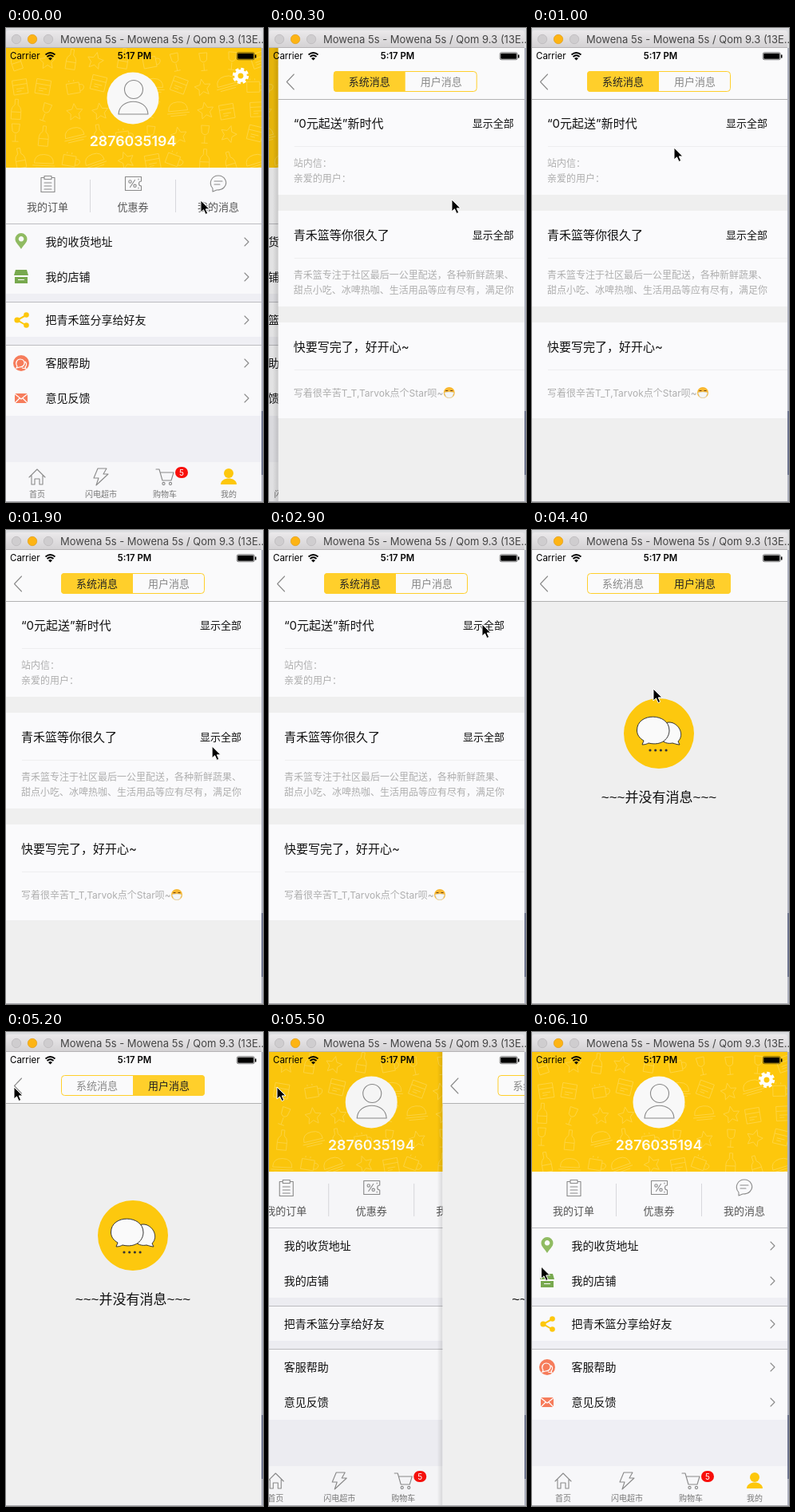
An HTML page for the animation above (6.2 s loop, 322 by 594 pixels).

```html
<!DOCTYPE html>
<html lang="zh-CN">
<head>
<meta charset="utf-8">
<style>
  html, body { margin: 0; width: 100%; height: 100%; overflow: hidden; background: #dcdde0; }
  svg { display: block; width: 322px; height: 594px; }
  text { font-family: Inter, "Noto Sans CJK SC", "Noto Sans CJK", sans-serif; }
  .mid { text-anchor: middle; }
  .line { fill: none; stroke: #8a8a8a; stroke-width: 1.1; stroke-linejoin: round; stroke-linecap: round; }
  .white { fill: none; stroke: #fff; stroke-width: 1.2; }
  .label { font-size: 13px; fill: #555; }
  .tab { font-size: 10px; fill: #777; }
  .row { font-size: 14px; fill: #111; }
  .title { font-size: 15px; fill: #111; }
  .body { font-size: 12px; fill: #aeaeae; }
  .more { font-size: 13px; fill: #111; }
  .notice { font: 17px "Liberation Sans", "Noto Sans CJK SC", sans-serif; fill: #111; }
</style>
</head>
<body>
<svg viewBox="0 0 322 594">
  <defs>
    <linearGradient id="chrome" x2="0" y2="1">
      <stop stop-color="#ebe9eb"/><stop offset="1" stop-color="#d3d1d3"/>
    </linearGradient>
    <linearGradient id="edge">
      <stop stop-color="#000" stop-opacity="0"/><stop offset="1" stop-color="#000" stop-opacity=".12"/>
    </linearGradient>
    <clipPath id="screen"><path d="M0 25h320v569H0z"/></clipPath>
    <clipPath id="header"><path d="M0 25h320v150H0z"/></clipPath>
    <clipPath id="pill"><rect x="69" y="54" width="180" height="26" rx="4"/></clipPath>
  </defs>

  <path fill="#adb0be" d="M320 25h2v569h-2z"/>
  <path fill="#6f7690" d="M320 480h2v80h-2z"/>

  <g clip-path="url(#screen)">
    <g id="home">
      <path fill="#efeff4" d="M0 25h320v569H0z"/>
      <path fill="#fdc70c" d="M0 25h320v150H0z"/>
      <g id="pattern" clip-path="url(#header)" fill="none" stroke="#fed545" stroke-width=".9"/>
      <circle cx="159" cy="88" r="32.5" fill="#f8f8f8"/>
      <g class="line" stroke-width="1.3">
        <circle cx="160" cy="77" r="11.5"/>
        <path d="M141 108c1-21 36-21 37 0z"/>
      </g>
      <circle cx="294" cy="60" r="8.7" fill="none" stroke="#fff" stroke-width="3" stroke-dasharray="4 2.83"/>
      <circle cx="294" cy="60" r="5.7" fill="none" stroke="#fff" stroke-width="4.4"/>
      <text class="mid" x="159" y="148" font-size="17.8" font-weight="600" fill="#fffdf2">2876035194</text>

      <path fill="#f9f9fb" d="M0 175h320v70H0zM0 245h320v88H0zM0 343h320v44H0zM0 397h320v89H0z"/>
      <path stroke="#d8d8dc" d="M105.5 190v41M212.5 190v41"/>
      <path stroke="#bdbdc1" d="M0 245.5h320M0 343.5h320M0 397.5h320"/>
      <g class="line">
        <path d="M48 187.500h-4v18h17v-18h-4M48 185.500h9v4h-9zM48 194h9M48 198h9M48 202h9"/>
        <path d="M149.500 186.500h20v5.500a3 3 0 0 0 0 6v5.500h-20zM155.500 199.500l6-9M166 189v1M166 200v1"/>
        <circle cx="155.500" cy="192.500" r="1.700"/><circle cx="161.500" cy="197.800" r="1.700"/>
        <path d="M259 201c-6-7-1-16 7-16s13 9 7 15c-3 3-7 3-9 3l-5 2zM261 192h10M261 196h7"/>
      </g>
      <g class="label mid">
        <text x="52" y="229">我的订单</text><text x="159" y="229">优惠券</text><text x="266" y="229">我的消息</text>
      </g>
      <g id="rows"></g>

      <path fill="#90bb62" fill-rule="evenodd" d="M19 277c-3-5-7.500-8-7.500-12.500a7.500 7.500 0 0 1 15 0c0 4.500-4.500 7.500-7.500 12.500zm0-16a3.300 3.300 0 1 0 .1 0z"/>
      <path fill="#78a94f" d="M12 303h14l2 7H10zM11 312h16v8H11z"/>
      <path class="white" d="M10 310.500h18M15 315.500h8"/>
      <path fill="none" stroke="#fdc70c" stroke-width="2" d="M26 359.500l-12 6.500 12 7"/>
      <g fill="#fdc70c"><circle cx="14" cy="366" r="3.600"/><circle cx="25.500" cy="359.500" r="3.300"/><circle cx="25.500" cy="372.500" r="3.300"/></g>
      <circle cx="19" cy="420" r="10" fill="#f67c5b"/>
      <path class="white" d="M14 424c-3-5 0-9 4-9s7 4 4 8c-2 2-4 2-5 2l-4 1zM24 418c3 3 1 6 0 7l1 2-5-1"/>
      <path fill="#f67c5b" d="M11 458h16v12H11z"/>
      <path class="white" d="M11 458.500l8 6.500 8-6.500M11 470l6-6M27 470l-6-6"/>

      <path fill="#f7f7f9" d="M0 544h320v50H0z"/>
      <g class="line">
        <path d="M29 563l10-10 10 10M32 561v11h4v-7h6v7h4v-11"/>
        <path d="M115 552h11l-4 7h6l-15 14 3-9h-6z"/>
        <path d="M188 553h4l4 14h11l3-10h-16"/>
        <circle cx="197.500" cy="571" r="1.600"/><circle cx="206" cy="571" r="1.600"/>
      </g>
      <g fill="#fdc70c"><circle cx="279" cy="558" r="6"/><path d="M269 572c0-10 20-10 20 0z"/></g>
      <rect x="212" y="550" width="16" height="14" rx="7" fill="#f8100c"/>
      <text class="mid" x="220" y="561" font-size="10" fill="#fff">5</text>
      <g class="tab mid">
        <text x="39" y="588">首页</text><text x="119" y="588">闪电超市</text>
        <text x="199" y="588">购物车</text><text x="279" y="588">我的</text>
      </g>
      <path id="dim" d="M0 25h320v569H0z"/>
    </g>

    <g id="page">
      <path fill="url(#edge)" d="M-7 25h7v569h-7z"/>
      <path fill="#efefef" d="M0 25h320v569H0z"/>
      <path fill="#fafafb" d="M0 25h320v64H0z"/>
      <path stroke="#b2b2b2" d="M0 89.500h320"/>
      <path class="line" d="M19.500 58l-9 9.500 9 9.500"/>
      <g clip-path="url(#pill)">
        <path id="chosen" fill="#ffcf2b" d="M69 54h90v26H69z"/>
      </g>
      <rect x="69.500" y="54.500" width="179" height="25" rx="4" fill="none" stroke="#ffcf2b"/>
      <g class="mid" font-size="13">
        <text id="system" x="114" y="72">系统消息</text><text id="user" x="204" y="72">用户消息</text>
      </g>
      <g id="list"></g>
      <g id="empty">
        <circle cx="159" cy="255" r="44" fill="#fdc80e"/>
        <g fill="#fafafa" stroke="#333">
          <path d="M176 267c4 1 6 2 9 2l-2-4c9-9 0-24-11-24s-19 15-9 23c4 3 8 4 13 3z"/>
          <path d="M146 267c17 4 26-6 26-16 0-22-40.500-23-40.500 0 0 6 3.500 10 8.500 13l-2 5c4 0 6-1 8-2z"/>
        </g>
        <path stroke="#333" stroke-width="3.200" stroke-linecap="round" stroke-dasharray="0 6.700" d="M148 276h21"/>
        <text class="notice mid" x="159" y="341">~~~并没有消息~~~</text>
      </g>
    </g>

    <text x="5" y="39" font-size="11.500">Carrier</text>
    <g fill="none" stroke="#000" stroke-width="1.700">
      <path d="M49.500 33.500q6-5 12 0M51.500 36q4-3.500 8 0"/>
    </g>
    <path d="M53 38q2.500-2 5 0l-2.500 2.500z"/>
    <text class="mid" x="161" y="39" font-size="11.300" font-weight="600">5:17 PM</text>
    <rect x="289.250" y="30.750" width="22" height="9" rx="2" fill="none" stroke="#000" stroke-width=".5"/>
    <rect x="290.250" y="31.750" width="20" height="7" rx="1"/><path d="M312 33.500h1.500v4H312z"/>
  </g>
  <path stroke="#a9a9ae" d="M0 593.500h322"/>

  <path fill="url(#chrome)" d="M0 25V6q0-3 4-3h312q4 0 4 3v19z"/>
  <path stroke="#b5b3b5" d="M0 24.500h320"/>
  <g fill="#cfcdcf" stroke="#b9b7b9" stroke-width=".7">
    <circle cx="13" cy="14" r="5.700"/><circle cx="53" cy="14" r="5.700"/>
    <circle cx="33" cy="14" r="5.700" fill="#fdb414" stroke="#e09d18"/>
  </g>
  <text x="68" y="19" font-size="13" fill="#444">Mowena 5s - Mowena 5s / Qom 9.3 (13E...</text>

  <path id="cursor" stroke="#fff" stroke-width="1" d="M0 0v15l3.500-3.200 2.600 5.700 2.600-1.200-2.500-5.400h4.800z"/>
</svg>
<script>
const $ = id => document.getElementById(id);
const LOOP = 6200, SWITCH = 3800, POP = 5363;

const text = (cls, x, y, s) => `<text class="${cls}" x="${x}" y="${y}">${s}</text>`;

$("rows").innerHTML = [
  ["我的收货地址", 268], ["我的店铺", 312], ["把青禾篮分享给好友", 366], ["客服帮助", 420], ["意见反馈", 464]
].map(([s, y]) => text("row", 49.5, y + 5, s) +
  `<path class="line" d="M299 ${y - 5}l5 5-5 5"/>`).join("");

$("list").innerHTML = [
  ["“0元起送”新时代", ["站内信：", "亲爱的用户："], true],
  ["青禾篮等你很久了", ["青禾篮专注于社区最后一公里配送，各种新鲜蔬果、", "甜点小吃、冰啤热咖、生活用品等应有尽有，满足你"], true],
  ["快要写完了，好开心~", ["写着很辛苦T_T,Tarvok点个Star呗~"], false]
].map(([title, lines, more], i) => {
  const y = 89 + i * 140;
  const first = lines.length > 1 ? y + 84.5 : y + 92.5;
  return `<path fill="#fafafc" d="M0 ${y + (i ? 0 : 1)}h320V${y + 120}H0z"/><path stroke="#eeeeef" d="M20 ${y + 59.5}h300"/>` +
    text("title", 19, y + 35.5, title) + (more ? text("more", 243, y + 34.5, "显示全部") : "") +
    lines.map((s, n) => text("body", 19, first + n * 19, s)).join("");
}).join("") +
  `<circle cx="214" cy="457" r="7" fill="#f9b832"/><path fill="#f4f6f8" stroke="#c9d0d6" stroke-width=".5" d="M208 457q6-2 12 0l-2 5q-4 3-8 0z"/>
   <path stroke="#6b4216" d="M209.500 454.500h3M215.500 454.500h3"/>`;

// Faint food doodles scattered over the header
const doodles = [
  "M-5-11h10l-1 9q-4 5-8 0zM0 2v9M-4 11h8",
  "M-2-13h4v7q4 3 4 7v11h-12V1q0-4 4-7zM-6 3h12",
  "M-10-5h16v13h-16zM6-2q7 0 5 5-1 3-5 3M-6-9v2M0-9v2",
  "M0-10l3 7 7 1-5 5 1 7-6-4-6 4 1-7-5-5 7-1z",
  "M-12 2q0-11 12-11t12 11zM-14 5h28M-10 8h20",
  "M-9-9h18v18h-18zM-9-3h18M-5 2h10M-5 5h6"
];
let seed = 11;
const random = () => (seed = seed * 16807 % 2147483647) / 2147483647;
for (let i = 0; i < 50; i++) {
  const x = 12 + i % 10 * 33 + random() * 8, y = 38 + Math.floor(i / 10) * 31 + random() * 6;
  $("pattern").innerHTML += `<path d="${doodles[Math.floor(random() * 6)]}" transform="translate(${x} ${y}) rotate(${random() * 40 - 20})"/>`;
}

// time, x, y of the pointer tip
const pointer = [
  [0, 244, 216], [300, 229, 215], [1000, 178, 150], [1500, 262, 118], [2250, 255, 395], [2800, 267, 118],
  [3050, 267, 118], [3700, 205, 67], [3850, 205, 67], [4400, 152, 199], [5200, 10, 69], [5500, 10, 69],
  [6100, 11.5, 294], [LOOP, 11.5, 294]
];

function pointerAt(t) {
  const i = pointer.findIndex(p => p[0] > t);
  const [t0, x0, y0] = pointer[i - 1], [t1, x1, y1] = pointer[i];
  const k = (t - t0) / (t1 - t0), e = k * k * (3 - 2 * k);
  return [x0 + (x1 - x0) * e, y0 + (y1 - y0) * e];
}

// Critically damped spring, from 0 to 1
function spring(ms) {
  const w = Math.max(0, ms) * 0.017;
  return 1 - (1 + w) * Math.exp(-w);
}

const move = (id, x, y = 0) => $(id).setAttribute("transform", `translate(${x} ${y})`);

function draw(now) {
  const t = now % LOOP;
  const shown = t < POP ? spring(t) : 1 - spring(t - POP);
  const onUser = t >= SWITCH;
  move("home", -96 * shown);
  move("page", 320 * (1 - shown));
  $("page").style.display = shown < 0.002 ? "none" : "";
  $("dim").setAttribute("opacity", 0.1 * shown * shown);
  move("chosen", onUser ? 90 : 0);
  $("system").setAttribute("fill", onUser ? "#888" : "#222");
  $("user").setAttribute("fill", onUser ? "#222" : "#888");
  $("list").style.display = onUser ? "none" : "";
  $("empty").style.display = onUser ? "" : "none";
  move("cursor", ...pointerAt(t));
}

const start = performance.now();
function tick() {
  draw(performance.now() - start);
  requestAnimationFrame(tick);
}
tick();
</script>
</body>
</html>
```
